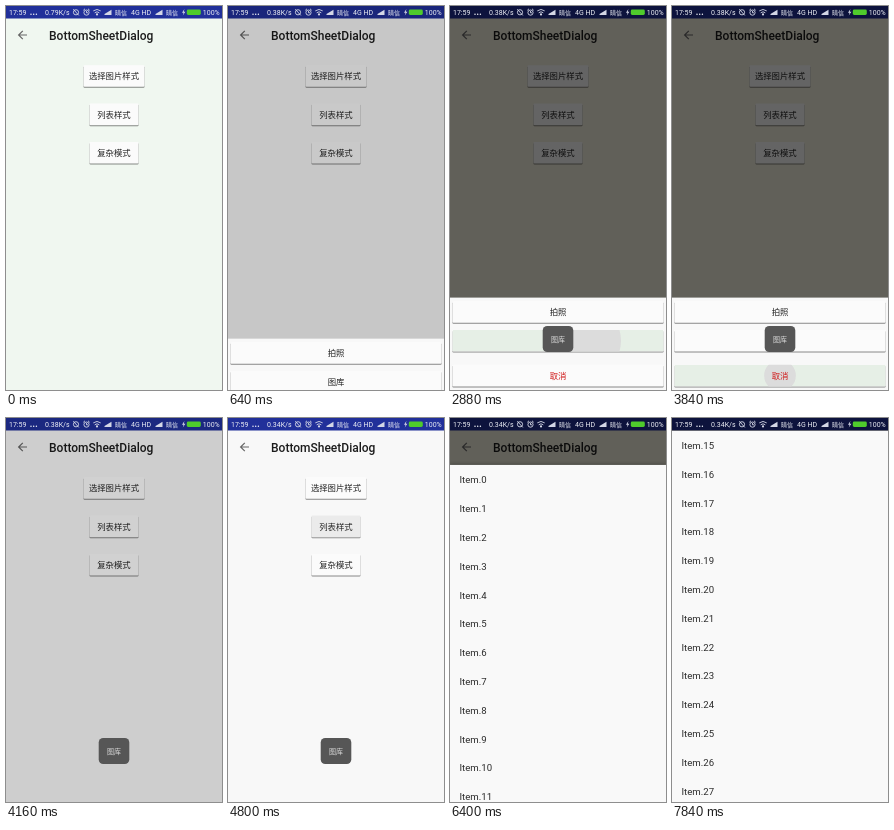
An HTML page for the animation above (8000 ms loop, 216 by 384 pixels).

```html
<!DOCTYPE html>
<html lang="zh-CN">
<head>
<meta charset="utf-8">
<title>BottomSheetDialog</title>
<style>
  html, body { margin: 0; width: 100%; height: 100%; overflow: hidden; background: #f8f8f8; }
  svg { display: block; width: 100%; height: 100%; }
  text { font-family: Roboto, "Noto Sans CJK SC", "Noto Sans CJK", sans-serif; }
  .title { font-size: 12px; font-weight: 500; fill: #1c1c1c; }
  .label { font-size: 8.4px; fill: #222; text-anchor: middle; }
  .item { font-size: 9.6px; fill: #2b2b2b; }
  .face { filter: drop-shadow(0 1px .6px rgba(0, 0, 0, .45)); }
  .lifted { filter: drop-shadow(0 -1px 1.5px rgba(0, 0, 0, .25)); }
  .status text { font-size: 7px; fill: #eef0f6; }
  .status .carrier { font-size: 6px; }
  .line { fill: none; stroke: #d4d7e6; stroke-width: .9; }
  .dots { stroke: #eef0f6; stroke-width: 1.5; stroke-linecap: round; stroke-dasharray: 0 2.7; }
  .solid { fill: #d4d7e6; }
</style>
</head>
<body>
<svg viewBox="0 0 216 384" preserveAspectRatio="none">
  <defs>
    <clipPath id="below"><rect y="12.5" width="216" height="371.5"/></clipPath>
    <path id="signal" class="solid" d="M0 6V5L7 .8V6Z"/>
  </defs>

  <rect id="page" width="216" height="384"/>
  <rect width="216" height="12.5" fill="#21309a"/>
  <path d="M21 29H12.8M16.8 24.8L12.6 29L16.8 33.2" fill="none" stroke="#666" stroke-width="1.2"/>
  <text class="title" x="43" y="33.5">BottomSheetDialog</text>
  <g id="pageButtons"></g>
  <rect id="dim" width="216" height="384"/>

  <g clip-path="url(#below)">
    <g id="menu"><rect width="216" height="93" fill="#f8f8f8"/></g>
    <g id="list">
      <rect class="lifted" width="216" height="400" fill="#f9f9f9"/>
      <g id="items"></g>
    </g>
  </g>

  <g id="toast">
    <rect x="92.7" y="320" width="30.6" height="26" rx="4.5" fill="#565656"/>
    <text x="108" y="335.6" text-anchor="middle" font-size="7" fill="#ddd">图库</text>
  </g>

  <g class="status">
    <text x="3" y="9">17:59</text>
    <path class="dots" d="M25 8.3h5.5"/>
    <text id="speed" x="39" y="9"></text>
    <g class="line">
      <circle cx="70" cy="6.3" r="2.6"/><path d="M67.3 3.2L72.8 9.4"/>
      <circle cx="80.5" cy="6.6" r="2.6"/><path d="M80.5 5V6.8H82M77.3 4.3L79 2.8M83.7 4.3L82 2.8"/>
      <path d="M87.3 4.9Q91 2 94.7 4.9M88.7 6.8Q91 4.8 93.3 6.8"/>
    </g>
    <circle class="solid" cx="91" cy="8.4" r="1.1"/>
    <use href="#signal" x="98.5" y="3"/>
    <text class="carrier" x="109" y="8.6">晴信</text>
    <text x="125" y="9">4G HD</text>
    <use href="#signal" x="149.5" y="3"/>
    <text class="carrier" x="160" y="8.6">晴信</text>
    <path class="solid" d="M178.4 3L176 6.8H177.6L176.8 9.6L179.4 5.8H177.8Z"/>
    <rect x="180.8" y="3.5" width="14" height="5.4" rx="1.4" fill="#4fcb2c"/>
    <text x="196.8" y="9">100%</text>
  </g>
</svg>
<script>
const LOOP = 8000, STEP = 160, ROW = 28.8, HEIGHT = 384;
const PEEK = 251, MENU = 3 * ROW + 6, FULL = HEIGHT - 12.5, SHADE = .6;
const $ = id => document.getElementById(id);

function add(parent, tag, attrs, text = '') {
  const node = document.createElementNS('http://www.w3.org/2000/svg', tag);
  for (const key in attrs) node.setAttribute(key, attrs[key]);
  node.textContent = text;
  return parent.appendChild(node);
}

const ramp = (t, from, to) => Math.min(1, Math.max(0, (t - from) / (to - from)));
const easeOut = p => 1 - (1 - p) ** 2;
const easeInOut = p => p * p * (3 - 2 * p);

const buttons = [];

function button(parent, label, cy, width, { press = Infinity, touchX = 108, color = '#222' } = {}) {
  const id = 'clip' + buttons.length;
  const box = { x: 108 - width / 2, y: cy - 10.8, width, height: 21.6, rx: 1 };
  add(add(parent, 'clipPath', { id }), 'rect', box);
  add(parent, 'rect', { ...box, class: 'face', fill: '#fbfbfb' });
  const ripple = add(parent, 'g', { 'clip-path': `url(#${id})` });
  add(ripple, 'rect', { ...box, fill: '#e6efe6' });
  const wave = add(ripple, 'circle', { cx: touchX, cy, fill: '#dcdcdc' });
  add(parent, 'text', { class: 'label', x: 108, y: cy + 3.1, style: `fill:${color}` }, label);
  buttons.push({ press, ripple, wave });
}

button($('pageButtons'), '选择图片样式', 70, 61, { press: 0 });
button($('pageButtons'), '列表样式', 108.4, 49, { press: 4320 });
button($('pageButtons'), '复杂模式', 146.8, 49);

button($('menu'), '拍照', ROW / 2, 211.2);
button($('menu'), '图库', ROW * 1.5, 211.2, { press: 2560, touchX: 132 });
button($('menu'), '取消', ROW * 2.5 + 6, 211.2, { press: 3680, color: '#d01c1c' });

for (let i = 0; i < 32; i++) add($('items'), 'text', { class: 'item', x: 9.5, y: 18.4 + i * ROW }, 'Item.' + i);

function place(id, top) {
  $(id).setAttribute('transform', `translate(0 ${top})`);
  $(id).setAttribute('visibility', top < HEIGHT ? 'visible' : 'hidden');
}

function pageColor(t, shade) {
  if (shade === 1) return '#f3f0df';
  return t < 640 ? '#f0f7f0' : '#f8f8f8';
}

function render(t) {
  const shade = ramp(t, 480, 960) - ramp(t, 3840, 4284) + ramp(t, 4800, 5130);
  $('page').setAttribute('fill', pageColor(t, shade));
  $('dim').setAttribute('opacity', SHADE * shade);

  const menuShown = easeOut(ramp(t, 480, 960)) - ramp(t, 3840, 4160);
  place('menu', HEIGHT - MENU * menuShown);

  const peek = PEEK * easeOut(ramp(t, 4800, 5120));
  const drag = (FULL - PEEK) * ramp(t, 6080, 6528);
  place('list', HEIGHT - peek - drag);
  place('items', -15 * ROW * easeInOut(ramp(t, 6560, 7840)));

  $('toast').setAttribute('opacity', ramp(t, 2560, 2880) - ramp(t, 5600, 5920));
  $('speed').textContent = (t < 480 ? '0.79' : t < 4480 ? '0.38' : '0.34') + 'K/s';

  for (const { press, ripple, wave } of buttons) {
    const age = Math.max(0, t - press);
    ripple.setAttribute('opacity', ramp(age, 0, 160) - ramp(age, 320, 640));
    wave.setAttribute('r', 39 * (age / 320) ** 1.3);
  }
}

const start = performance.now();
function frame() {
  const t = (performance.now() - start) % LOOP;
  render(Math.floor(t / STEP) * STEP);
  requestAnimationFrame(frame);
}
frame();
</script>
</body>
</html>
```
